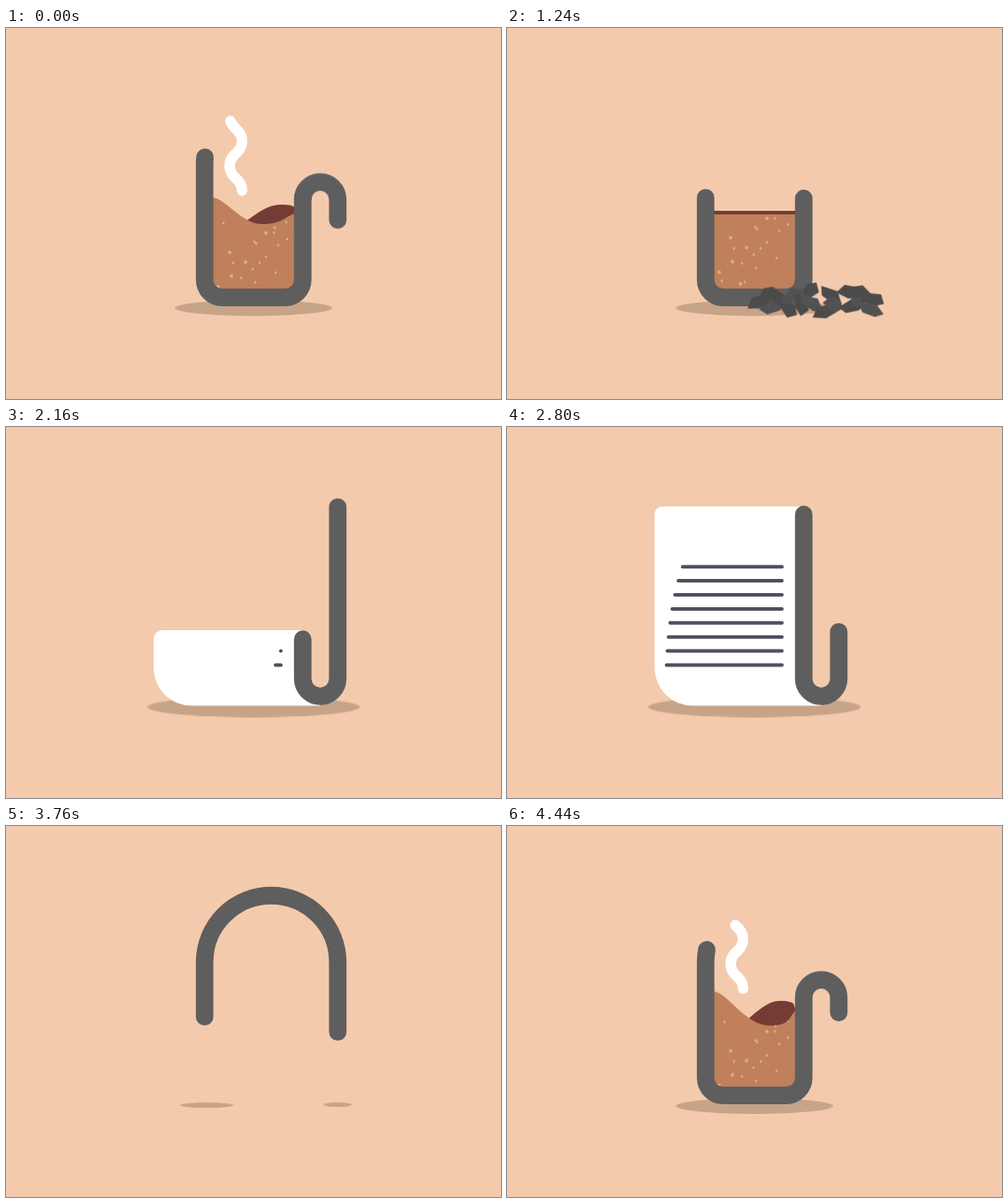
Recreate the animation shown at these times as an HTML page without scripts. Size 560 by 420 pixels, loop 4.48 s.

```html
<!DOCTYPE html>
<html lang="en">
<head>
<meta charset="utf-8">
<title>Coffee and paper</title>
<style>
html, body { margin: 0; width: 100%; height: 100%; overflow: hidden; background: #f4caac; }
svg { display: block; width: 560px; height: 420px; }
svg * { animation: 4480ms linear infinite; }

.line { fill: none; stroke: #5e5e5e; stroke-width: 19.8; stroke-linecap: round; }
.shade { fill: #c7a488; }

/* hard switches */
@keyframes cupOn { 0% { opacity: 1 } 47% { opacity: 0 } }
@keyframes handleOn { 0% { opacity: 1 } 21.43% { opacity: 0 } }
@keyframes crackOn { 0% { opacity: 0 } 15.18% { opacity: 1 } 21.43% { opacity: 0 } }
@keyframes shardsOn { 0% { opacity: 0 } 21.43% { opacity: 1 } 47% { opacity: 0 } }
@keyframes dropOn { 0% { opacity: 0 } 36.61% { opacity: 1 } 62.5% { opacity: 0 } }
@keyframes snakeOn { 0% { opacity: 0 } 62.5% { opacity: 1 } }

/* the mug leaves to the left */
.slide { animation-name: slide; }
@keyframes slide {
  0%, 36.61% { transform: translateX(0) }
  39.29% { transform: translateX(-25px) }
  41.07% { transform: translateX(-85px) }
  43.75% { transform: translateX(-230px) }
  46.88%, 60% { transform: translateX(-470px) }
  60.01%, 100% { transform: translateX(0) }
}

.cup { animation-name: sink, cupOn; animation-timing-function: cubic-bezier(.2,.44,.5,1), step-end; }
@keyframes sink {
  0% { stroke-dasharray: 364.6 3000; stroke-dashoffset: -646 }
  13.39%, 100% { stroke-dasharray: 318.6 3000; stroke-dashoffset: -692 }
}
.handle { animation-name: lower, curl, handleOn; animation-timing-function: cubic-bezier(.3,.42,.4,1), ease-in-out, step-end; }
@keyframes lower {
  0% { transform: translateY(0); stroke-width: 19.8 }
  12.5%, 100% { transform: translateY(70px); stroke-width: 22 }
}
@keyframes curl {
  0%, 2.5% { stroke-dasharray: 85 600 }
  12.5%, 100% { stroke-dasharray: 147 600 }
}
.crack { fill: none; stroke: #4b4b4b; stroke-width: 1; animation-name: crackOn; animation-timing-function: step-end; }

.shards { animation-name: shardsOn; animation-timing-function: step-end; }
.shards use { fill: #4b4b4b; animation-name: shatter; }
.shards use:nth-child(3n) { fill: #525252; }
@keyframes shatter {
  0%, 21.43% {
    transform: translate(calc(356px + var(--x) * .3px), calc(275px + (var(--y) - 308) * 2.2px)) rotate(0deg);
    animation-timing-function: cubic-bezier(.2,.6,.6,1);
  }
  23.5% {
    transform: translate(calc(353px + var(--x) * .6px), calc(268px + (var(--y) - 308) * 2.4px)) rotate(calc(var(--a) * .4deg));
    animation-timing-function: cubic-bezier(.5,0,.9,.7);
  }
  27.5%, 100% { transform: translate(calc(350px + var(--x) * 1px), calc(var(--y) * 1px)) rotate(calc(var(--a) * 1deg)) }
}

/* coffee */
.back { fill: #743c34; animation-name: back; animation-timing-function: ease-in-out; }
.front { fill: #bf805b; animation-name: front; animation-timing-function: ease-in-out; }
@keyframes back {
  0% { d: path("M233 236C260 236 285 200 310 200S322 206 328 207V300H233z") }
  5% { d: path("M233 204C260 204 285 212 310 212S322 210 328 210V300H233z") }
  10.71% { d: path("M233 209C260 209 285 203 310 203S322 206 328 206V300H233z") }
  16.07% { d: path("M233 207C258 212 285 206 305 206S322 208 328 209V300H233z") }
  23%, 47% { d: path("M233 207C260 207 285 207 310 207S322 207 328 207V300H233z") }
  47.1%, 88.39% { d: path("M233 300C260 300 285 300 310 300S322 300 328 300V300H233z") }
  94.64% { d: path("M233 250C260 250 285 222 310 222S322 226 328 228V300H233z") }
  99.11% { d: path("M233 241C260 241 284 198 308 198S321 205 328 207V300H233z") }
  100% { d: path("M233 236C260 236 285 200 310 200S322 206 328 207V300H233z") }
}
@keyframes front {
  0% { d: path("M233 192C248 192 266 222 290 222S316 212 328 210V300H233z") }
  5% { d: path("M233 218C248 218 266 206 290 206S316 208 328 210V300H233z") }
  10.71% { d: path("M233 204C248 204 266 214 290 214S316 212 328 211V300H233z") }
  16.07% { d: path("M233 208C248 210 262 208 280 209S312 215 328 215V300H233z") }
  23%, 47% { d: path("M233 211C248 211 266 211 290 211S316 211 328 211V300H233z") }
  47.1%, 88.39% { d: path("M233 300C248 300 266 300 290 300S316 300 328 300V300H233z") }
  94.64% { d: path("M233 216C248 216 266 246 292 246S316 232 328 230V300H233z") }
  99.11% { d: path("M233 187C248 187 270 226 297 226S318 214 328 208V300H233z") }
  100% { d: path("M233 192C248 192 266 222 290 222S316 212 328 210V300H233z") }
}
.dots { fill: none; stroke: #e2ab88; stroke-linecap: round; animation-name: fizz; }
@keyframes fizz {
  0% { transform: translateY(0) }
  47% { transform: translateY(-28px) }
  47.1%, 88.39% { transform: translateY(7px) }
  100% { transform: translateY(0) }
}

/* steam: dash runs up a wavy track */
.steam { fill: none; stroke: #fff; stroke-width: 12; stroke-linecap: round; }
.s1 { animation-name: steam1; }
.s2 { animation-name: steam2; }
@keyframes steam1 {
  0% { stroke-dasharray: 79 300; stroke-dashoffset: 0 }
  4.46% { stroke-dasharray: 104 300; stroke-dashoffset: -10 }
  16.07% { stroke-dasharray: 120 300; stroke-dashoffset: -111 }
  16.96% { stroke-dasharray: 120 300; stroke-dashoffset: -120 }
  17%, 90.18% { stroke-dasharray: 8 300; stroke-dashoffset: 10 }
  90.5% { stroke-dasharray: 2 300; stroke-dashoffset: 0 }
  99.11% { stroke-dasharray: 72 300; stroke-dashoffset: 0 }
  100% { stroke-dasharray: 79 300; stroke-dashoffset: 0 }
}
@keyframes steam2 {
  0%, 1.8% { stroke-dasharray: 8 300; stroke-dashoffset: 10 }
  2.2% { stroke-dasharray: 3 300; stroke-dashoffset: 0 }
  10.71% { stroke-dasharray: 86 300; stroke-dashoffset: -4 }
  16.07% { stroke-dasharray: 33 300; stroke-dashoffset: -76 }
  20.54% { stroke-dasharray: 33 300; stroke-dashoffset: -120 }
  20.6%, 100% { stroke-dasharray: 8 300; stroke-dashoffset: 10 }
}

/* line falling in, then running out and over */
.drop { stroke-dasharray: 301 3000; animation-name: drop, dropOn; animation-timing-function: linear, step-end; }
@keyframes drop {
  0%, 36.61% { stroke-dashoffset: 16 }
  39.29% { stroke-dashoffset: -97; animation-timing-function: cubic-bezier(.3,.35,.7,.8) }
  48.21% { stroke-dashoffset: -420; animation-timing-function: cubic-bezier(.2,.45,.5,1) }
  62.5%, 100% { stroke-dashoffset: -561 }
}
.snake { animation-name: snake, snakeOn; animation-timing-function: linear, step-end; }
@keyframes snake {
  0%, 62.5% { stroke-dasharray: 301 3000; stroke-dashoffset: -39; animation-timing-function: cubic-bezier(.5,0,.75,.6) }
  75% { stroke-dasharray: 299 3000; stroke-dashoffset: -194; animation-timing-function: cubic-bezier(.4,.25,.7,.55) }
  83.93% { stroke-dasharray: 377 3000; stroke-dashoffset: -338; animation-timing-function: cubic-bezier(.25,.4,.6,.87) }
  100% { stroke-dasharray: 450 3000; stroke-dashoffset: -646 }
}

/* paper follows the line end */
.roll { animation-name: roll; }
@keyframes roll {
  0%, 36.61% { transform: translateY(667px) }
  39.29% { transform: translateY(554px); animation-timing-function: cubic-bezier(.3,.35,.7,.8) }
  48.21% { transform: translateY(231px); animation-timing-function: cubic-bezier(.2,.45,.5,1) }
  62.5% { transform: translateY(89.5px); animation-timing-function: cubic-bezier(.5,0,.75,.6) }
  75% { transform: translateY(244px); animation-timing-function: cubic-bezier(.4,.25,.7,.55) }
  83.93%, 100% { transform: translateY(388px) }
}
.text use {
  fill: none; stroke: #544c5e; stroke-width: 4; stroke-linecap: round; stroke-dasharray: 131 600;
  animation-name: write; animation-delay: calc(var(--i) * 40ms - 4480ms);
}
@keyframes write {
  0%, 46.2% { stroke-dashoffset: 135; animation-timing-function: cubic-bezier(.35,.1,.2,1) }
  64.2%, 78% { stroke-dashoffset: 0 }
  80%, 100% { stroke-dashoffset: 135 }
}

/* ground shadows */
.cupShade { animation-name: cupShade; }
@keyframes cupShade {
  0%, 47% { transform: translate(280px,317px) scale(89,9) }
  47.1%, 80.36% { transform: translate(225px,316px) scale(0,0) }
  83.93% { transform: translate(227px,316px) scale(30,3); animation-timing-function: ease-out }
  94.64%, 100% { transform: translate(280px,317px) scale(89,9) }
}
.paperShade { animation-name: paperShade; }
@keyframes paperShade {
  0%, 42.4% { transform: translate(375px,316px) scale(0,0); animation-timing-function: ease-out }
  47.5%, 75% { transform: translate(280px,317px) scale(120,11.5); animation-timing-function: ease-in-out }
  83.93% { transform: translate(375px,315.5px) scale(16,2.6) }
  87.5%, 100% { transform: translate(375px,315.5px) scale(0,0) }
}
</style>
</head>
<body>
<svg viewBox="0 0 560 420">
  <defs>
    <path id="track" d="M335.7 60V285a19.8 19.8 0 0 0 39.6 0V154a75.3 75.3 0 0 0-150.6 0V285a20 20 0 0 0 20 20h71a20 20 0 0 0 20-20V194a19.8 19.8 0 0 1 39.6 0V285"/>
    <path id="wave" pathLength="112" d="M267 184C267 170 253 170 253 156S267 142 267 128S253 114 253 100S267 86 267 72"/>
    <path id="row" d="M311 0H180"/>
    <path id="a" d="M-13 4L-6-7L9-8L14 2L2 7z"/>
    <path id="b" d="M-15-3L4-7L15 3L6 8L-9 6z"/>
    <path id="c" d="M-10 7L-8-4L1-9L11-5L8 6z"/>
    <clipPath id="inside"><rect x="233.5" y="100" width="93" height="196" rx="10"/></clipPath>
    <clipPath id="fill"><path class="front" d="M233 192C248 192 266 222 290 222S316 212 328 210V300H233z"/></clipPath>
    <clipPath id="page"><path d="M167 0V272a43 43 0 0 0 43 43.5H355.5V305A19.8 19.8 0 0 1 335.7 285V0z"/></clipPath>
    <clipPath id="sheet"><rect class="roll" x="167" width="188" height="400"/></clipPath>
  </defs>

  <g class="slide">
    <circle class="shade cupShade" r="1"/>
    <g clip-path="url(#inside)">
      <path class="back" d="M233 236C260 236 285 200 310 200S322 206 328 207V300H233z"/>
      <path class="front" d="M233 192C248 192 266 222 290 222S316 212 328 210V300H233z"/>
      <g clip-path="url(#fill)">
        <g class="dots">
          <path stroke-width="2.8" d="M246 221h.01M281 242h.01M283 244h.01M303 232h.01M304 226h.01M318 239h.01M308 246h.01M257 266h.01M287 266h.01M294 259h.01M279 273h.01M305 277h.01M266 283h.01M282 288h.01M317 220h.01M243 303h.01M269 304h.01"/>
          <path stroke-width="4" d="M294 232h.01M253 254h.01M271 265h.01M255 281h.01M240 293h.01M264 306h.01"/>
        </g>
      </g>
    </g>
    <use href="#track" class="line cup"/>
    <path class="line handle" d="M335.7 194a19.8 19.8 0 0 1 39.6 0v22a19.8 19.8 0 0 1-39.6 0"/>
    <path class="crack" d="M326 262l7 3l5-1l8 4"/>
    <g class="shards">
      <use href="#a" style="--x:-66;--y:311;--a:-12"/>
      <use href="#c" style="--x:-53;--y:301;--a:20"/>
      <use href="#b" style="--x:-50;--y:315;--a:-25"/>
      <use href="#c" style="--x:-32;--y:318;--a:60"/>
      <use href="#a" style="--x:-41;--y:308;--a:35"/>
      <use href="#b" style="--x:-28;--y:303;--a:-40"/>
      <use href="#a" style="--x:-18;--y:312;--a:80"/>
      <use href="#c" style="--x:-7;--y:298;--a:-30"/>
      <use href="#b" style="--x:-5;--y:311;--a:25"/>
      <use href="#a" style="--x:8;--y:322;--a:-8"/>
      <use href="#b" style="--x:17;--y:302;--a:30"/>
      <use href="#c" style="--x:19;--y:313;--a:45"/>
      <use href="#a" style="--x:36;--y:299;--a:15"/>
      <use href="#b" style="--x:40;--y:314;--a:-20"/>
      <use href="#c" style="--x:46;--y:306;--a:70"/>
      <use href="#b" style="--x:48;--y:298;--a:4"/>
      <use href="#a" style="--x:63;--y:308;--a:10"/>
      <use href="#b" style="--x:62;--y:318;--a:12"/>
    </g>
  </g>

  <use href="#wave" class="steam s1"/>
  <g transform="translate(41.5 -8)"><use href="#wave" class="steam s2"/></g>

  <circle class="shade paperShade" r="1"/>
  <g clip-path="url(#page)">
    <rect class="roll" x="167" width="188" height="400" rx="9" fill="#fff"/>
    <g class="text" clip-path="url(#sheet)">
      <use href="#row" y="269.5" style="--i:0"/>
      <use href="#row" y="253.6" style="--i:1"/>
      <use href="#row" y="237.7" style="--i:2"/>
      <use href="#row" y="221.8" style="--i:3"/>
      <use href="#row" y="205.9" style="--i:4"/>
      <use href="#row" y="190" style="--i:5"/>
      <use href="#row" y="174.1" style="--i:6"/>
      <use href="#row" y="158.2" style="--i:7"/>
    </g>
  </g>
  <path class="line drop" d="M375.3-330V285a19.8 19.8 0 0 1-39.6 0V60"/>
  <use href="#track" class="line snake"/>
</svg>
</body>
</html>
```
